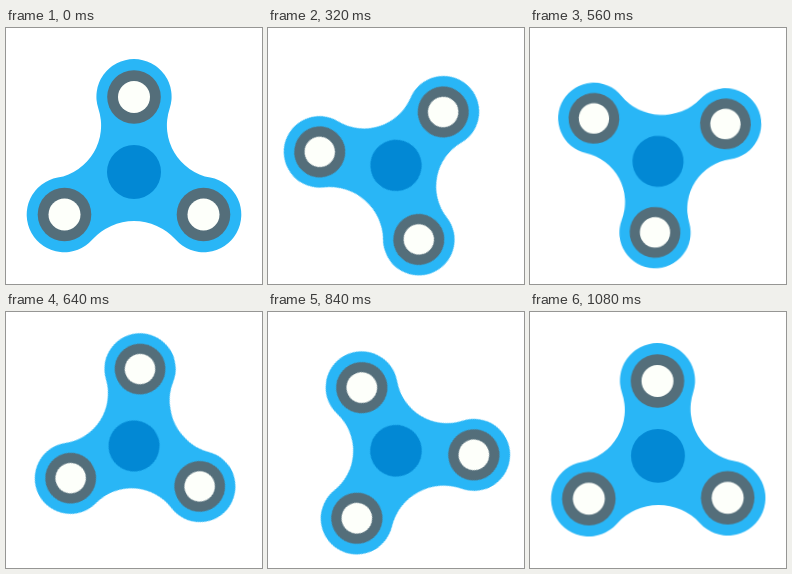
Recreate the animation shown at these times as an HTML page. Size 256 by 256 pixels, loop 1120 ms.

```html
<!DOCTYPE html>
<html lang="en">
<head>
<meta charset="utf-8">
<title>Spinner</title>
<style>
  html, body { margin: 0; width: 100%; height: 100%; overflow: hidden; background: #fff; }
  svg { display: block; width: 100%; height: 100%; }

  .lift, .shrink, .spin { animation: 1120ms -2ms infinite; transform-origin: 0 0; }
  .lift { animation-name: lift; animation-timing-function: cubic-bezier(.37, 0, .63, 1); }
  .shrink { animation-name: shrink; animation-timing-function: cubic-bezier(.37, 0, .63, 1); }
  .spin { animation-name: spin; animation-timing-function: cubic-bezier(.6, 0, .4, 1); }

  @keyframes lift {
    0%, 100% { transform: translate(128px, 144px); }
    50% { transform: translate(128px, 133.4px); }
  }
  @keyframes shrink {
    0%, 100% { transform: scale(1); }
    35%, 65% { transform: scale(.947); }
  }
  @keyframes spin {
    from { transform: rotate(0deg); }
    to { transform: rotate(360deg); }
  }

  .body { fill: #29b6f6; }
  .hub { fill: #0288d4; }
  .ring { fill: #546e7a; }
  .hole { fill: #fdfffa; }
</style>
</head>
<body>
<svg viewBox="0 0 256 256">
  <defs>
    <g id="bearing">
      <circle class="ring" r="26.8"/>
      <circle class="hole" r="16"/>
    </g>
  </defs>
  <g class="lift"><g class="shrink"><g class="spin">
    <path class="body" d="M-35.6 -63.2
      A37.6 37.6 0 1 1 35.6 -63.2 A53 53 0 0 0 76.3 5.6
      A37.6 37.6 0 1 1 41.6 67.6 A56 56 0 0 0 -41.6 67.6
      A37.6 37.6 0 1 1 -76.3 5.6 A53 53 0 0 0 -35.6 -63.2Z"/>
    <circle class="hub" r="27"/>
    <use href="#bearing" y="-75"/>
    <use href="#bearing" x="-69.5" y="42.5"/>
    <use href="#bearing" x="69.5" y="42.5"/>
  </g></g></g>
</svg>
</body>
</html>
```
